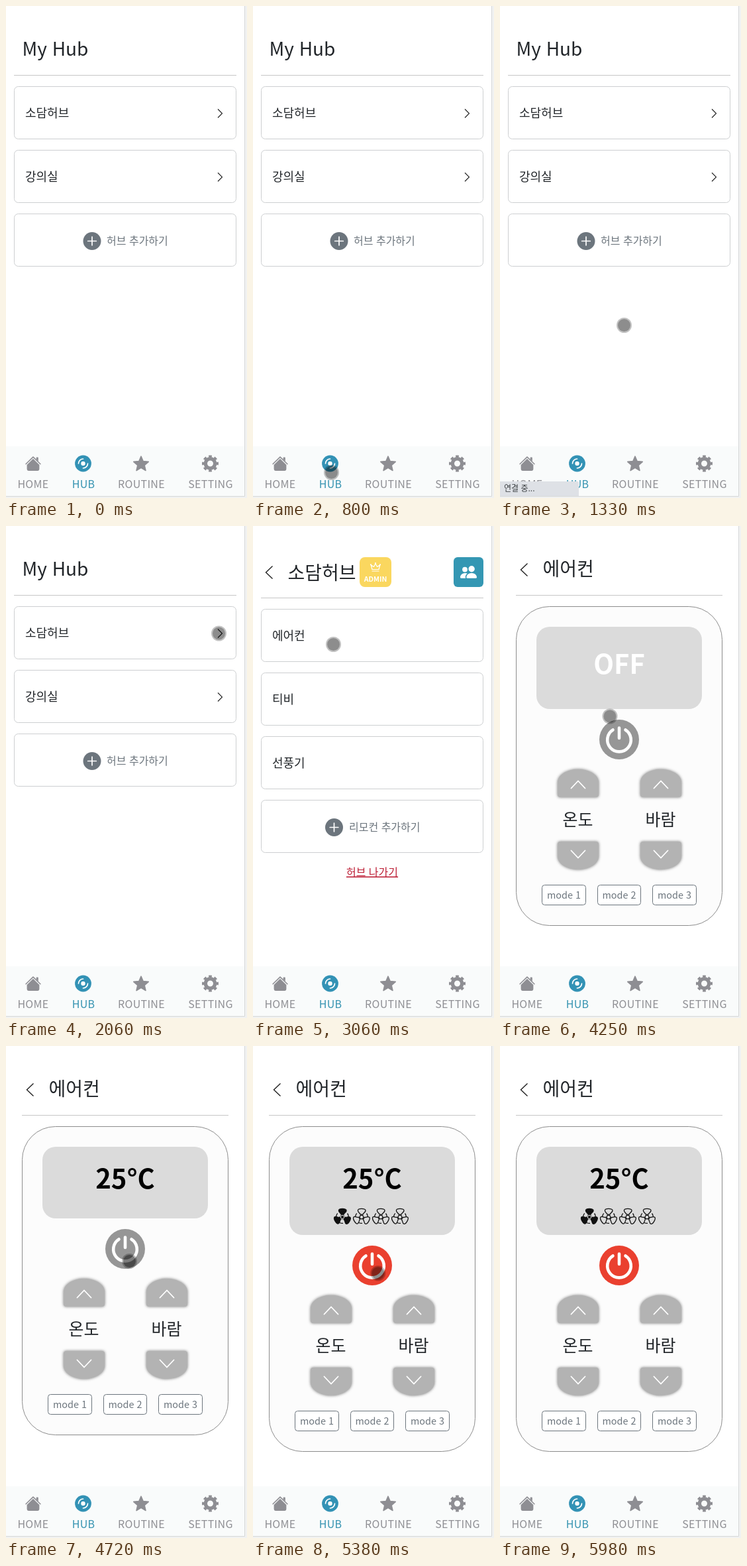
Recreate the animation shown at these times as an HTML page. Size 364x742 px, loop 6970 ms.

```html
<!DOCTYPE html>
<html lang="ko">
<head>
<meta charset="utf-8">
<title>My Hub</title>
<style>
  html, body { margin: 0; width: 100%; height: 100%; overflow: hidden; background: #f0f1f1; }
  svg { display: block; width: 364px; height: 742px; }
  text { font-family: "Noto Sans CJK KR", "Noto Sans CJK JP", "Noto Sans", sans-serif; fill: #212529; }
  .title { font-size: 28px; font-weight: 500; }
  .name { font-size: 18px; font-weight: 500; }
  .add { font-size: 16px; fill: #6c757d; }
  .leave { font-size: 16px; fill: #bd1f36; text-decoration: underline; }
  .label { font-size: 25px; font-weight: 500; }
  .mode { font-size: 14.4px; fill: #6c757d; }
  .screen { font-size: 40px; font-weight: 700; }
  .admin { font-size: 10.5px; font-weight: 700; fill: #fff; }
  .nav text { font-size: 16px; font-weight: 500; fill: #8e8e93; }
  .nav .on { fill: #3392b0; }
  .status { font-size: 12px; fill: #3c4043; }
  .mid { text-anchor: middle; }
  .line { fill: none; stroke: #222; }
  .white { fill: none; stroke: #fff; stroke-linecap: round; }
  .rule { stroke: #c6c6c6; }
  .card { fill: #fff; stroke: #cdcfd1; }
  .key { fill: #b3b3b3; filter: drop-shadow(0 0 2px #777); }
</style>
</head>
<body>
<svg viewBox="0 0 364 742">
  <defs>
    <rect id="card" class="card" x="12.5" y=".5" width="335" height="79" rx="6"/>
    <path id="next" class="line" stroke-width="1.1" d="M320 34.5l6.5 6.5-6.5 6.5"/>
    <path id="back" class="line" stroke-width="1.4" d="M29.5 60.5l-10 9.5 10 9.5"/>
    <g id="plus">
      <circle r="13.5" fill="#6c757d"/>
      <path class="white" stroke-width="1.7" d="M-6.3 0H6.3M0-6.3V6.3"/>
    </g>
    <g id="key">
      <path class="key" d="M-31 17V-1C-31-13-16-21 0-21S31-13 31-1V17Q31 21 27 21H-27Q-31 21-31 17Z"/>
      <path class="white" stroke-width="1.8" d="M-10.5 7.5L0-3.5 10.5 7.5"/>
    </g>
    <path id="blade" d="M-1.8-3.8C-2-6-6-7-5.6-10.2-5-13.2 4.5-13.4 6-10.4 6.8-7.5 2.4-6.6 2-3.8Z"/>
    <g id="fan" stroke="#111" stroke-width="1.3" stroke-linejoin="round">
      <use href="#blade"/>
      <use href="#blade" transform="rotate(120)"/>
      <use href="#blade" transform="rotate(240)"/>
      <circle r="2.9"/>
      <path fill="none" d="M7.5-5.5A9 9 0 0 1 9.3 0M1 9.4A9 9 0 0 1-4 8.5M-9.3-1A9 9 0 0 1-7.3-5.7"/>
    </g>
  </defs>

  <rect width="360" height="739" fill="#fff"/>
  <path d="M360.5 0V739.5H0" fill="none" stroke="#d6d8d9"/>

  <g id="hubs">
    <text class="title" x="24.5" y="75">My Hub</text>
    <path class="rule" d="M12 104.5H348"/>
    <use href="#card" y="121"/><use href="#card" y="217"/><use href="#card" y="313"/>
    <text class="name" x="29" y="167.5">소담허브</text>
    <text class="name" x="29" y="263.5">강의실</text>
    <use href="#next" y="121"/><use href="#next" y="217"/>
    <use href="#plus" x="130" y="354.5"/>
    <text class="add" x="152" y="359.5">허브 추가하기</text>
  </g>

  <g id="remotes">
    <use href="#back"/>
    <text class="title" x="52.5" y="81">소담허브</text>
    <rect x="161" y="47" width="48" height="45" rx="8" fill="#fad75f"/>
    <g class="white" stroke-width="1.2" stroke-linejoin="round">
      <path d="M180 65.5L178.3 59 182.5 61.5 185 56.8 187.5 61.5 191.7 59 190 65.5ZM180 68H190"/>
      <path stroke-width="2.2" d="M178 58.3h0M185 56h0M192 58.3h0"/>
    </g>
    <text class="admin mid" x="185" y="84">ADMIN</text>
    <rect x="303" y="47" width="45" height="45" rx="6" fill="#3497b3"/>
    <g fill="#fff" transform="translate(313 57) scale(1.56)">
      <circle cx="11" cy="5" r="3"/><circle cx="4.5" cy="5.5" r="2.5"/>
      <path d="M7 14Q6 14 6 13C6 12 7 9 11 9S16 12 16 13Q16 14 15 14Z"/>
      <path d="M5.2 14Q4.3 11.3 6.9 9.3 6 9 5 9C1 9 0 12 0 13Q0 14 1 14Z"/>
    </g>
    <path class="rule" d="M12 108.5H348"/>
    <use href="#card" y="125"/><use href="#card" y="221"/><use href="#card" y="317"/><use href="#card" y="413"/>
    <text class="name" x="29" y="172">에어컨</text>
    <text class="name" x="29" y="268">티비</text>
    <text class="name" x="29" y="364">선풍기</text>
    <use href="#plus" x="122.5" y="454.5"/>
    <text class="add" x="145" y="459.5">리모컨 추가하기</text>
    <text class="leave mid" x="180" y="527.5">허브 나가기</text>
  </g>

  <g id="remote">
    <use href="#back" x="12" y="-4"/>
    <text class="title" x="64.5" y="74.5">에어컨</text>
    <path class="rule" d="M24 104.5H336"/>
    <rect id="body" x="24.5" y="121.5" width="311" height="481" rx="50" fill="#fcfcfc" stroke="#8c8c8c"/>
    <rect id="panel" x="55" y="152" width="250" height="124" rx="20" fill="#dbdbdb"/>
    <text id="screen" class="screen mid" x="180"></text>
    <g id="fans">
      <use href="#fan" x="135" y="258" fill="#111"/>
      <circle cx="135" cy="258" r="2.6" fill="#111" stroke="#dbdbdb"/>
      <g fill="none">
        <use href="#fan" x="164" y="258"/><use href="#fan" x="193" y="258"/><use href="#fan" x="222" y="258"/>
      </g>
    </g>
    <g id="keys">
      <circle id="power" cx="180" cy="322" r="30"/>
      <path class="white" stroke-width="4.6" d="M180 304.5V320M170.5 307.5A17.8 17.8 0 1 0 189.5 307.5"/>
      <use href="#key" transform="translate(118 388)"/>
      <use href="#key" transform="translate(243 388)"/>
      <use href="#key" transform="translate(118 497) scale(1 -1)"/>
      <use href="#key" transform="translate(243 497) scale(1 -1)"/>
      <text class="label mid" x="117.5" y="452">온도</text>
      <text class="label mid" x="242.5" y="452">바람</text>
      <g fill="#fff" stroke="#6c757d">
        <rect x="63.5" y="541.5" width="66" height="30" rx="4"/>
        <rect x="147.5" y="541.5" width="65" height="30" rx="4"/>
        <rect x="230.5" y="541.5" width="66" height="30" rx="4"/>
      </g>
      <text class="mode mid" x="96.5" y="562">mode 1</text>
      <text class="mode mid" x="180" y="562">mode 2</text>
      <text class="mode mid" x="263.5" y="562">mode 3</text>
    </g>
  </g>

  <g class="nav">
    <rect y="664" width="360" height="75" fill="#f9fbfb"/>
    <g fill="#8e8e93">
      <g transform="translate(28.5 677.5) scale(1.56)">
        <path d="M8 3.3L14 9.3V13.5Q14 15 12.5 15H3.5Q2 15 2 13.5V9.3ZM13 6V2.5Q13 2 12.5 2H11.5Q11 2 11 2.5V4Z"/>
        <path fill="none" stroke="#8e8e93" stroke-linecap="round" stroke-linejoin="round" d="M1 8.5L8 1.7 15 8.5"/>
      </g>
      <path id="star" stroke="#8e8e93" stroke-width="1.6" stroke-linejoin="round"/>
      <g fill="none" stroke="#8e8e93">
        <circle cx="308.5" cy="690" r="7.2" stroke-width="5.4"/>
        <circle cx="308.5" cy="690" r="10.6" stroke-width="3.8" pathLength="16" stroke-dasharray="1.1 .9" stroke-dashoffset=".55"/>
      </g>
    </g>
    <circle cx="116.5" cy="690" r="12.4" fill="#3392b5"/>
    <circle cx="116.5" cy="690" r="3.2" fill="#fff"/>
    <path class="white" stroke-width="1.7" d="M109.5 690A7 7 0 0 1 116.5 683M123.5 690A7 7 0 0 1 116.5 697"/>
    <g class="mid" letter-spacing=".3">
      <text x="41" y="727">HOME</text>
      <text class="on" x="117" y="727">HUB</text>
      <text x="204.5" y="727">ROUTINE</text>
      <text x="309" y="727">SETTING</text>
    </g>
  </g>

  <g id="status">
    <path d="M0 717H117Q119 717 119 719V739H0Z" fill="#dee1e6"/>
    <text class="status" x="6" y="732">연결 중...</text>
  </g>

  <g id="cursor">
    <circle r="11.5" fill-opacity=".24"/>
    <circle id="dot" r="9.5"/>
  </g>
</svg>
<script>
  const LOOP = 6970, TICKS = 105;
  const $ = id => document.getElementById(id);
  const show = (id, on) => $(id).style.display = on ? '' : 'none';
  const within = (n, a, b) => n >= a && n < b;

  // Touch path: tick, x, y
  const path = [
    [6, 197, 742], [8, 172, 722], [10, 134, 708], [12, 118.5, 703.5], [15, 118.5, 703.5],
    [16, 121, 698], [17, 131, 676], [18, 148, 643], [19, 168, 563], [20, 187.5, 481.5],
    [21, 204, 383], [22, 222, 332], [23, 250, 290], [24, 289, 236], [25, 316.5, 195.5],
    [26, 326, 176], [27, 331, 163], [28, 331, 158], [30, 325, 159], [31, 321.5, 162],
    [37, 321.5, 162], [39, 297, 178], [40, 270, 190], [42, 204, 185], [43, 160, 181],
    [45, 123.5, 178.5], [46, 121.5, 178.5], [48, 121.5, 178.5], [49, 120.5, 173.5],
    [58, 120.5, 173.5], [60, 125, 186], [64, 166, 287], [67, 186.5, 324.5], [79, 186.5, 324.5],
    [82, 190, 352], [84, 203, 446], [87, 229, 632], [88, 246, 698], [89, 251.5, 738], [90, 253, 760]
  ];

  function touchAt(n) {
    const i = path.findIndex(p => p[0] > n);
    if (i < 1) return null;
    const [a, ax, ay] = path[i - 1], [b, bx, by] = path[i];
    const k = (n - a) / (b - a);
    return [ax + (bx - ax) * k, ay + (by - ay) * k];
  }

  function statusAlpha(n) {
    if (within(n, 18, 22) || within(n, 56, 59)) return 1;
    if (within(n, 22, 24)) return (24 - n) / 3;
    if (within(n, 59, 62)) return (62 - n) / 4;
    return 0;
  }

  function drawRemote(n) {
    const on = n >= 71, ready = n >= 72;
    const shift = ready ? 9 : on ? -16 : 0;
    $('body').setAttribute('height', 481 + shift);
    $('panel').setAttribute('height', 124 + shift);
    $('keys').setAttribute('transform', `translate(0 ${shift})`);
    $('screen').textContent = on ? '25°C' : 'OFF';
    $('screen').setAttribute('y', on ? 215 : 223);
    $('screen').style.fill = on ? '#000' : '#fff';
    $('power').setAttribute('fill', ready ? '#ea402f' : '#969696');
    show('fans', ready);
  }

  function draw(n) {
    show('hubs', n < 35);
    show('remotes', within(n, 35, 54));
    show('remote', n >= 54);
    drawRemote(n);
    $('status').style.opacity = statusAlpha(n);

    const at = touchAt(n);
    show('cursor', at);
    if (at) $('cursor').setAttribute('transform', `translate(${at})`);
    const pressed = n === 15 || n === 32 || within(n, 51, 54) || within(n, 70, 73);
    $('dot').setAttribute('fill-opacity', pressed ? .36 : .27);
  }

  const star = Array.from({ length: 10 }, (_, i) => {
    const r = i % 2 ? 5.4 : 11.8, a = i * Math.PI / 5;
    return [204 + r * Math.sin(a), 691 - r * Math.cos(a)];
  });
  $('star').setAttribute('d', 'M' + star.join('L') + 'Z');

  const start = performance.now();
  let last = -1;
  function tick() {
    const t = (performance.now() - start) % LOOP;
    const n = Math.floor(t / LOOP * TICKS + .05) % TICKS;
    if (n !== last) draw(last = n);
    requestAnimationFrame(tick);
  }
  tick();
</script>
</body>
</html>
```
